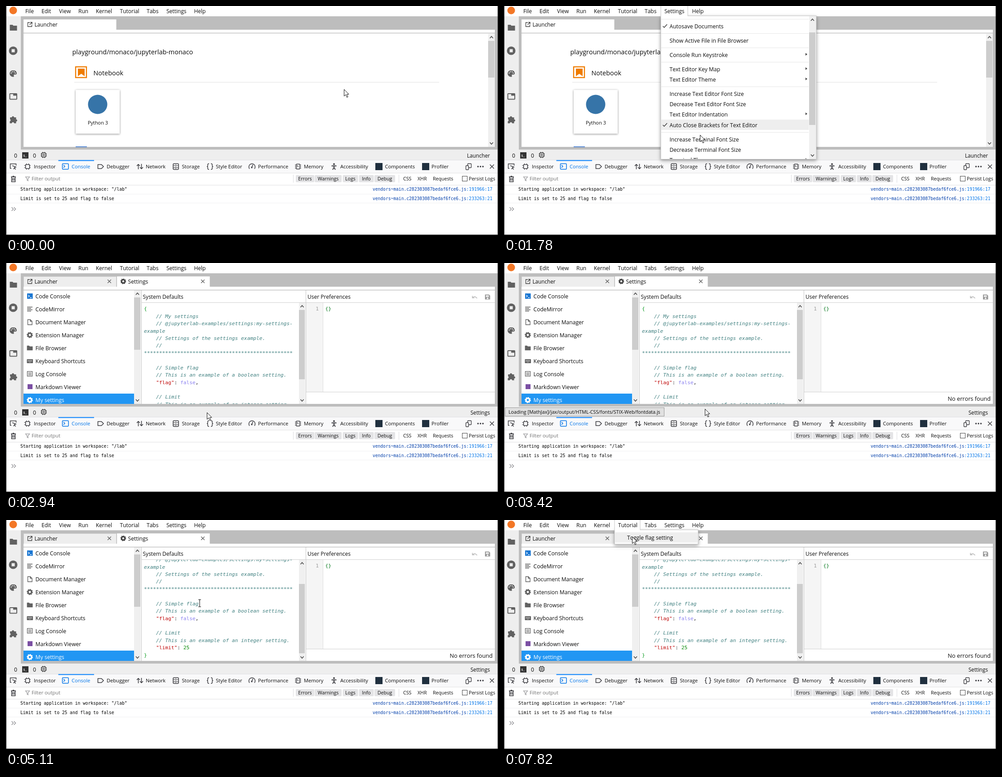
Write an HTML page that moves like this. It is 1095 px wide and 512 px high and loops after 8 s.

```html
<!DOCTYPE html>
<html lang="en">
<head>
<meta charset="utf-8">
<title>Settings walkthrough</title>
<style>
html, body { margin: 0; width: 100%; height: 100%; overflow: hidden; background: #fff; }
svg { display: block; width: 100vw; height: 100vh; }
text {
  font-family: "Open Sans", "Noto Sans", sans-serif; font-size: 12.1px;
  font-kerning: none; fill: #0c0c0c; white-space: pre;
}
.log { font-family: "DejaVu Sans Mono", monospace; font-size: 9.65px; fill: #000; }
.code { font-family: "DejaVu Sans Mono", monospace; font-size: 11.23px; }
.dev { font-size: 11.1px; }
.small { font-size: 10.6px; }
.head { font-size: 14.4px; }
.bar { font-size: 12px; }
.tab { font-size: 11.7px; }
.shadow {
  filter: drop-shadow(0 2px 3px rgba(0,0,0,.22)) drop-shadow(0 4px 5px rgba(0,0,0,.18));
}
</style>
</head>
<body>
<script>
const STEP = 77.3, LOOP = 8000;
const GREY = '#616161', DARK = '#38383d', BLUE = '#0074e8';

// Drawing helpers
const rect = (x, y, w, h, fill, more = '') =>
  `<rect x="${x}" y="${y}" width="${w}" height="${h}" fill="${fill}" ${more}/>`;
const text = (x, y, s, cls = '', more = '') =>
  `<text x="${x}" y="${y}" class="${cls}" ${more}>${s}</text>`;
const path = (d, stroke, w = 1, fill = 'none', more = '') =>
  `<path d="${d}" stroke="${stroke}" stroke-width="${w}" fill="${fill}" ${more}/>`;
const solid = (d, fill) => `<path d="${d}" fill="${fill}" fill-rule="evenodd"/>`;
const disc = (x, y, r, fill, more = '') => `<circle cx="${x}" cy="${y}" r="${r}" fill="${fill}" ${more}/>`;
const group = (id, body) => `<g id="${id}">${body}</g>`;
const move = (x, y, body) => `<g transform="translate(${x} ${y})">${body}</g>`;
const end = 'text-anchor="end"', mid = 'text-anchor="middle"';

const gear = (x, y, r, c) => move(x, y,
  disc(0, 0, r * .62, 'none', `stroke="${c}" stroke-width="${r * .5}"`) +
  disc(0, 0, r * .9, 'none', `stroke="${c}" stroke-width="${r * .3}" pathLength="16" stroke-dasharray="1.1 .9"`));
const folder = (x, y, k, c) => move(x, y,
  solid(`M${-8 * k} ${-6.5 * k}h${6 * k}l${2 * k} ${2 * k}h${8 * k}v${11 * k}h${-16 * k}z`, c));
const cross = (x, y, r, c, w = 1.4) =>
  path(`M${x - r} ${y - r}l${2 * r} ${2 * r}m0 ${-2 * r}l${-2 * r} ${2 * r}`, c, w);
const chevron = (x, y, d) => path(`M${x - 3.5} ${y + 2 * d}l3.5 ${-4 * d}l3.5 ${4 * d}`, '#505050', 1.8);
const scrollbar = (x, top, bottom, w, from, size, id) =>
  rect(x, top, w, bottom - top, '#f0f0f0') +
  rect(x, from, w - 1, size, '#cdcdcd', `id="${id}"`) +
  chevron(x + w / 2, top + 8, 1) + chevron(x + w / 2, bottom - 8, -1);

// Fixed window parts
const menuBar = () => {
  const names = ['File', 'Edit', 'View', 'Run', 'Kernel', 'Tutorial', 'Tabs', 'Settings', 'Help'];
  const xs = [43, 79, 118, 161, 200, 253.5, 313, 357, 418.5];
  return names.map((s, i) => text(xs[i], 15.5, s, 'bar')).join('');
};

const sidebar = () => folder(16.5, 48.5, 1, GREY) +
  disc(16, 100, 9.5, GREY) + rect(12.5, 96.5, 7, 7, '#eee') +
  solid('M16 143.5a8 7.5 0 0 0 0 15c2 0 2-2 1.3-3c-.6-1.5.5-2.2 2-2.2h2c5 0 3-9.8-5.3-9.8z', GREY) +
  [[11.5, 150], [14, 147], [18, 147], [20.5, 150]].map(p => disc(...p, 1.2, '#eee')).join('') +
  rect(8.5, 196, 15.5, 12.5, 'none', `stroke="${GREY}" stroke-width="2" rx="1"`) + rect(16, 196, 8, 4.5, GREY) +
  solid('M9 249h4a2.3 2.3 0 1 1 5 0h4.5v4.5a2.3 2.3 0 1 1 0 4.8v4h-4.5a2.4 2.4 0 0 0-5 0h-4.5v-4.5a2.4 2.4 0 0 0 .5-4.5z', GREY);

const statusBar = () => rect(1, 321, 1093, 23, '#eee') +
  text(18, 338.5, '0') + rect(36, 327, 14, 14, '#333') +
  text(38, 337, '$_', '', 'style="font-size:8px;fill:#fff"') + text(60, 338.5, '0') +
  rect(79.5, 328.5, 9, 9, 'none', 'stroke="#333" stroke-width="1.5" rx="1"') +
  rect(82.5, 331.5, 3, 3, 'none', 'stroke="#333"') +
  path('M82 326v2m4-2v2m-4 10v2m4-2v2m-9-9h2m-2 4h2m10-4h2m-2 4h2', '#333', 1.2);

const devIcons = () => [
  path('M12 363h-2.5v-10h13v4M14 357l8 3l-3.5 1.5l3 4m-3-4l-1.5 3.5z', DARK, 1.4),
  rect(43.5, 354.5, 9, 9, 'none', `stroke="${DARK}" stroke-width="1.6" rx="1"`) +
    path('M45.5 352v2m5-2v2m-5 10v2m5-2v2m-10-9.5h2m-2 5h2m10-5h2m-2 5h2', DARK),
  rect(125.5, 352.5, 13.5, 12.5, 'none', `stroke="${BLUE}" stroke-width="1.5" rx="1.5"`) +
    path('M128 355.5l3 3l-3 3', BLUE, 1.4),
  path('M204.5 354.5h8l4.5 4.5l-4.5 4.5h-8z', DARK, 1.5),
  path('M294.5 365v-11m-3.5 3.5l3.5-3.5l3.5 3.5M301.5 353v11m-3.5-3.5l3.5 3.5l3.5-3.5', DARK, 1.5),
  rect(372, 352.5, 12, 13, 'none', `stroke="${DARK}" stroke-width="1.5" rx="2"`) +
    path('M372 357h12m-12 4.5h12m-7-6.5h2m-2 4.5h2m-2 4h2', DARK, 1.1),
  path('M452 352.5q-3 0-3 2v2.5q0 2-2 2q2 0 2 2v2.5q0 2 3 2M456 352.5q3 0 3 2v2.5q0 2 2 2q-2 0-2 2v2.5q0 2-3 2', DARK, 1.4),
  path('M542 364a7 7 0 1 1 11 0M547 361l2.5-6', DARK, 1.5) + disc(547, 361, 1.7, DARK),
  rect(646, 353.5, 8, 11, 'none', `stroke="${DARK}" stroke-width="1.5" rx="1"`) +
    path('M643 355.5h2m-2 3.5h2m-2 3.5h2m10-7h2m-2 3.5h2m-2 3.5h2M648.5 356v2.5h3', DARK, 1.2),
  disc(730, 353.5, 1.9, DARK) + path('M724.5 357.5h11M730 357v4l-3 5m3-5l3 5', DARK, 1.8),
  rect(822, 351, 16, 16, '#20303f'), rect(926, 351, 16, 16, '#20303f'),
  rect(1027.5, 352.5, 8, 9, 'none', `stroke="${DARK}" stroke-width="1.3" rx="1"`) +
    rect(1023.5, 357, 6, 9, '#f9f9fa', `stroke="${DARK}" stroke-width="1.3" rx="1"`),
  [1050.5, 1056, 1061.5].map(x => disc(x, 359, 1.7, DARK)).join(''),
  cross(1081.5, 359, 4.5, DARK)
].join('');

const devTools = () => {
  const tabs = [['Inspector', 62], ['Console', 146], ['Debugger', 224], ['Network', 311], ['Storage', 391.5],
    ['Style Editor', 467], ['Performance', 561], ['Memory', 663], ['Accessibility', 744],
    ['Components', 843.5], ['Profiler', 947]];
  const filters = [['Errors', 645, 41], ['Warnings', 687, 60], ['Logs', 749.5, 34], ['Info', 785.5, 33], ['Debug', 820, 46]];
  const js = 'vendors~main.c282303087bedaf6fce6.js';
  const row = (y, s, pos) => text(32, y, s, 'log') +
    text(1082.5, y, `${js}<tspan fill="${BLUE}">:${pos}</tspan>`, 'log', `${end} style="fill:#003eaa"`);
  return rect(1, 344, 1093, 168, '#fff') + rect(1, 344, 1093, 29, '#f9f9fa') +
    [344, 373, 400].map(y => rect(1, y, 1093, 1, '#e0e0e2')).join('') +
    rect(116.5, 344.5, 79.5, 2, '#0a84ff') +
    tabs.map(([s, x]) => text(x, 363, s, 'dev', s === 'Console' ? `style="fill:${BLUE}"` : '')).join('') + devIcons() +
    path('M11 382h11m-7.5-1.5h4M12.5 382.5v10.5h8v-10.5M15 384.5v6m3-6v6', DARK, 1.6) +
    path('M43.5 382h9l-3.5 4.5v4.5l-2-1.5v-3z', '#8a8a8e', 1.1) +
    text(57, 390, 'Filter output', 'dev', 'style="fill:#737373"') +
    filters.map(([s, x, w]) => rect(x, 378, w, 16, '#e4e4e6', 'rx="2"') + text(x + w / 2, 390, s, 'small', mid)).join('') +
    rect(639, 377, 1, 18, '#dcdce0') + rect(874, 377, 1, 18, '#dcdce0') +
    text(884, 390, 'CSS', 'small') + text(916, 390, 'XHR', 'small') + text(950, 390, 'Requests', 'small') +
    rect(1015.5, 380.5, 11, 11, '#fff', 'stroke="#444"') + text(1030, 390, 'Persist Logs', 'small') +
    row(413.3, 'Starting application in workspace: "/lab"', '191966:17') +
    row(433.6, 'Limit is set to 25 and flag to false', '233263:21') +
    rect(1, 420, 1093, 1, '#f0f0f2') + rect(1, 440, 1093, 1, '#f0f0f2') +
    path('M12.5 450l4 4l-4 4m5-8l4 4l-4 4', '#8a8a8e', 1.3);
};

const launcherLabel = path('M53 37h-4.5v9h9v-4.5M54 36.5h4v4M58 36.5l-5.5 5.5', '#424242', 1.3) +
  text(63.5, 46, 'Launcher', 'tab');
const panel = rect(39, 53, 1049, 7, '#fff') + rect(39, 61, 1049, 254, '#fff');

const launcher = () => rect(39, 30, 206.5, 24, '#fff') + launcherLabel + panel +
  text(147.5, 107.5, 'playground/monaco/jupyterlab-monaco', 'head') +
  rect(155, 136, 24, 24, 'none', 'stroke="#ef7c00" stroke-width="2.4"') +
  solid('M160 140h15v17l-7.5-5.5l-7.5 5.5z', '#ef7c00') +
  text(194.5, 154.5, 'Notebook', 'head') + rect(152, 170, 812, 1, '#e0e0e0') +
  rect(155, 187.5, 98, 98, '#fff', 'style="filter:drop-shadow(0 1px 2px rgba(0,0,0,.45))"') +
  disc(204, 220, 21.5, '#3674a8') + text(204.5, 265, 'Python 3', '', `${mid} style="font-size:10.9px"`) +
  rect(155, 314, 25, 1.5, '#2f6fd0') + scrollbar(1073, 62, 315, 15, 78, 82, 'pageThumb') +
  text(1077, 338.5, 'Launcher', 'tab', end);

const plugins = () => {
  const icons = [
    rect(47, 68, 12.5, 12, '#1976d2') + path('M49.5 71.5l2.5 2.5l-2.5 2.5m4 1h3.5', '#fff', 1.3),
    path('M47 98.5h12m-12 3h9m-9 3h12m-12 3h9', GREY, 1.3),
    path('M48.5 126.5h5.5l4 4v7.5h-9.5zM54 126.5v4h4', GREY, 1.4),
    gear(53, 161, 6.5, GREY),
    folder(53, 190, .8, GREY),
    rect(46.5, 215, 13.5, 9, GREY, 'rx="1"') +
      path('M48.5 217.5h9.5m-9.5 2h9.5m-7 2.3h4.5', '#fff', 1, 'none', 'stroke-dasharray="1.2 .8"'),
    rect(47.5, 242.5, 11, 10.5, 'none', `stroke="${GREY}" stroke-width="1.3"`) +
      path('M49.5 245.5h7m-7 2.3h7m-7 2.3h7', GREY, 1.1),
    rect(48, 271, 11, 11, '#7b4fa3'),
    gear(53, 306.5, 6.5, '#fff')
  ];
  return ['Code Console', 'CodeMirror', 'Document Manager', 'Extension Manager', 'File Browser',
    'Keyboard Shortcuts', 'Log Console', 'Markdown Viewer', 'My settings'].map((s, i) =>
    (i === 8 ? rect(39, 292, 246, 23, '#2196f3') : '') + icons[i] +
    text(65.5, 78.5 + 29 * i, s, '', i === 8 ? 'style="fill:#fff"' : '')).join('');
};

const codeLines = () => [
  '{', '// My settings', '// @jupyterlab-examples/settings:my-settings-', 'example',
  '// Settings of the settings example.', '//', '*'.repeat(49), '',
  '// Simple flag', '// This is an example of a boolean setting.', '"flag": false,', '',
  '// Limit', '// This is an example of an integer setting.', '"limit": 25', '}'
].map((s, i) => {
  const note = /^(\/|\*|ex)/.test(s), indent = /^[\/"]/.test(s) ? 27 : 0;
  const body = s.replace(/^(".*"): (\w+)/, (_, key, val) =>
    `<tspan fill="#c00808">${key}</tspan>: <tspan fill="${val === '25' ? '#080' : '#8a80f0'}">${val}</tspan>`);
  const style = note ? 'fill:#408080;font-style:italic' : /[{}]/.test(s) ? 'fill:#0a9a20' : '';
  return text(307 + indent, (106.2 + 16.43 * i).toFixed(1), body, 'code', `style="${style}"`);
}).join('');

const settings = () => rect(39.5, 30.5, 206, 23, '#eee', 'stroke="#d4d4d4"') + launcherLabel + cross(230, 41, 3.8, GREY) +
  rect(247, 30, 206.5, 24, '#fff') + gear(261, 41, 6, '#424242') + text(271.5, 46, 'Settings') + cross(438, 41, 3.8, GREY) +
  panel + plugins() +
  scrollbar(285, 61, 315, 15, 77, 117, 'listThumb') + rect(301, 61, 1, 254, '#c4c4c4') +
  text(304.5, 80, 'System Defaults', 'bar') + rect(302, 88, 365, 1, '#d0d0d0') +
  `<g clip-path="url(#codeClip)">${group('code', codeLines())}</g>` +
  scrollbar(652, 89, 315, 14, 105, 155, 'codeThumb') + rect(667, 61, 1, 254, '#c4c4c4') +
  text(671, 80, 'User Preferences', 'bar') + rect(668, 88, 420, 1, '#d0d0d0') +
  rect(668, 89, 37, 199, '#f5f5f5') + rect(705, 89, 1, 199, '#ddd') + rect(668, 288, 420, 1, '#d0d0d0') +
  text(696, 106.2, '1', 'code', `${end} style="fill:#999"`) + text(710.5, 106.2, '{}', 'code', 'style="fill:#0a7a20"') +
  path('M1038 73.5v4.5h4.5M1038.5 77.5q5-5 10 1.5', '#bdbdbd', 1.6) +
  solid('M1066 70.5h9l2.5 2.5v8.5h-11.5zM1068 72.5h6.5v3h-6.5zM1071.7 77a1.8 1.8 0 1 0 .1 0z', '#9a9a9a') +
  group('checked', text(1083, 308, 'No errors found', '', `${end} style="font-size:12.7px"`)) +
  text(1077, 338.5, 'Settings', 'tab', end);

const message = () => rect(2.5, 323.5, 354, 19, '#e0e0e0', 'stroke="#999"') +
  text(10, 337, 'Loading [MathJax]/jax/output/HTML-CSS/fonts/STIX-Web/fontdata.js', '', 'style="font-size:10.7px"');

// Label prefix: > opens a submenu, + is ticked, - starts a new section
const menuItems = ['>JupyterLab Theme', '-+Autosave Documents', '-Show Active File in File Browser',
  '->Console Run Keystroke', '->Text Editor Key Map', '>Text Editor Theme', '-Increase Text Editor Font Size',
  'Decrease Text Editor Font Size', '>Text Editor Indentation', '+Auto Close Brackets for Text Editor',
  '-Increase Terminal Font Size', 'Decrease Terminal Font Size', '>Terminal Theme',
  '-+Enable Extension Manager (experimental)', '-Advanced Settings Editor'];
const itemY = [];

const openTitle = (x, w, label) => rect(x, 0, w, 23, '#fff') +
  path(`M${x} 22.5V0m${w} 0v22.5`, '#c4c4c4') + text(x + 8, 15.5, label, 'bar');

const settingsMenu = () => {
  let pos = 15.75;
  const items = menuItems.map(s => {
    const [, flags, label] = s.match(/^([->+]*)(.*)/);
    const gap = flags.includes('-');
    pos += gap ? 32 : 23.25;
    const y = Math.floor(pos);
    itemY.push(y);
    return (gap ? rect(350, y - 16, 328, 1, '#e6e6e6') : '') + text(368.5, y + 4.5, label) +
      (flags.includes('>') ? solid(`M671 ${y - 4}l4 3l-4 3z`, '#444') : '') +
      (flags.includes('+') ? path(`M353.5 ${y}l3 3l6.5-7`, '#333', 1.4) : '');
  }).join('') + text(664, itemY[14] + 4.5, 'Ctrl+,', '', end);
  return `<g class="shadow">${rect(349, 22, 346, 320.5, '#fff', 'stroke="#c4c4c4"')}</g>` +
    openTitle(349, 60, 'Settings') +
    `<g clip-path="url(#menuClip)">${group('items', rect(349.5, 0, 329, 23, '#eee', 'id="active"') + items)}</g>` +
    scrollbar(679, 23, 342, 15, 39, 207, 'menuThumb');
};

const tutorialMenu = () => `<g class="shadow">${rect(246, 22, 186, 32, '#fff', 'stroke="#c4c4c4"')}</g>` +
  openTitle(246, 57, 'Tutorial') +
  rect(246.5, 27.5, 185, 23, '#eee', 'id="toggle"') + text(274, 43.5, 'Toggle flag setting');

const cursors = () =>
  group('arrow', path('M.5 .5V15.5L4 12.2L6.5 18.2L9 17.2L6.5 11.3H11z', '#111', 1, '#fff')) +
  group('beam', path('M-3 -8h2.5l.5 .5l.5 -.5h2.5M0 -7.5v15M-3 8h2.5l.5 -.5l.5 .5h2.5', '#111', 1.1));

document.body.innerHTML = `<svg viewBox="0 0 1095 512" preserveAspectRatio="none">
  <defs>
    <clipPath id="codeClip">${rect(302, 89, 350, 226, '#000')}</clipPath>
    <clipPath id="menuClip">${rect(349, 23, 330, 319, '#000')}</clipPath>
  </defs>` +
  rect(0, 0, 1095, 512, '#fff') + rect(1, 23, 1093, 298, '#bdbdbd') + rect(1, 23, 32, 298, '#eee') +
  disc(16, 10, 8.5, '#f37726') + rect(246, 0, 57, 23, '#eee', 'id="hoverTutorial"') +
  rect(349, 0, 60, 23, '#eee', 'id="hoverSettings"') + menuBar() + sidebar() +
  statusBar() + devTools() + rect(39, 60, 1049, 1, '#a8a8a8') +
  group('launcher', launcher()) + group('settings', settings()) + group('message', message()) +
  group('settingsMenu', settingsMenu()) + group('tutorialMenu', tutorialMenu()) +
  rect(0, 0, 1, 512, '#333') + rect(1094, 0, 1, 512, '#333') + rect(0, 511, 1095, 1, '#333') + cursors() + '</svg>';

// Keys are [step, ...values]
const pointer = [[-1, 752, 186], [1, 690, 150], [4, 520, 70], [6, 420, 28], [8, 380, 11], [10, 380, 11],
  [11, 398, 126], [12, 413, 169], [14, 428, 240], [16, 436, 288], [22, 436, 288], [23, 438, 305], [26, 447, 334],
  [28, 447, 334], [30, 447, 326], [31, 447, 334], [38, 447, 334], [39, 447, 326], [42, 460, 195], [44, 464, 145],
  [58, 464, 145], [62, 420, 200], [65, 350, 245], [69, 339, 216], [70, 339, 216], [73, 315, 120],
  [76, 294, 46], [80, 273, 10], [90, 273, 10], [96, 285, 37]];
const menuScroll = [[17, 0], [21, 103]];
const codeScroll = [[49, 0], [52, 23.3], [55, 46.6]];
const activeItem = [[11, 3], [13, 4], [14, 6], [15, 8], [16, 9], [23, 13], [25, 14]];

function at(keys, n) {
  const i = keys.findIndex(k => k[0] > n);
  if (i === 0) return keys[0].slice(1);
  if (i < 0) return keys[keys.length - 1].slice(1);
  const a = keys[i - 1], b = keys[i], u = (n - a[0]) / (b[0] - a[0]);
  return a.slice(1).map((v, j) => v + (b[j + 1] - v) * u);
}

const $ = id => document.getElementById(id);
const show = (id, on) => $(id).setAttribute('display', on ? 'inline' : 'none');
const place = (id, x, y) => $(id).setAttribute('transform', `translate(${Math.round(x)} ${Math.round(y)})`);

function render(ms) {
  const n = Math.floor((ms - 380) / STEP);
  const [x, y] = at(pointer, n), [menuY] = at(menuScroll, n), [codeY] = at(codeScroll, n);
  const open = n >= 33;
  show('launcher', !open);
  show('settings', open);
  show('checked', n >= 36);
  show('message', n >= 36 && n < 42);
  show('hoverSettings', n === 8);
  show('settingsMenu', n >= 9 && n < 33);
  show('hoverTutorial', n >= 78 && n < 82);
  show('tutorialMenu', n >= 82);
  show('toggle', n >= 93);

  const active = activeItem.filter(k => k[0] <= n).pop();
  show('active', active && !open);
  if (active) $('active').setAttribute('y', itemY[active[1]] - 12);
  place('items', 0, -menuY);
  place('menuThumb', 0, menuY * 78.5 / 103);
  place('code', 0, -codeY);
  place('codeThumb', 0, codeY * 38 / 46.6);

  const overText = open && x > 302 && x < 652 && y > 89 && y < 315;
  show('beam', overText);
  show('arrow', !overText);
  place(overText ? 'beam' : 'arrow', x, y);
}

function tick() {
  render(performance.now() % LOOP);
  requestAnimationFrame(tick);
}
tick();
</script>
</body>
</html>
```
